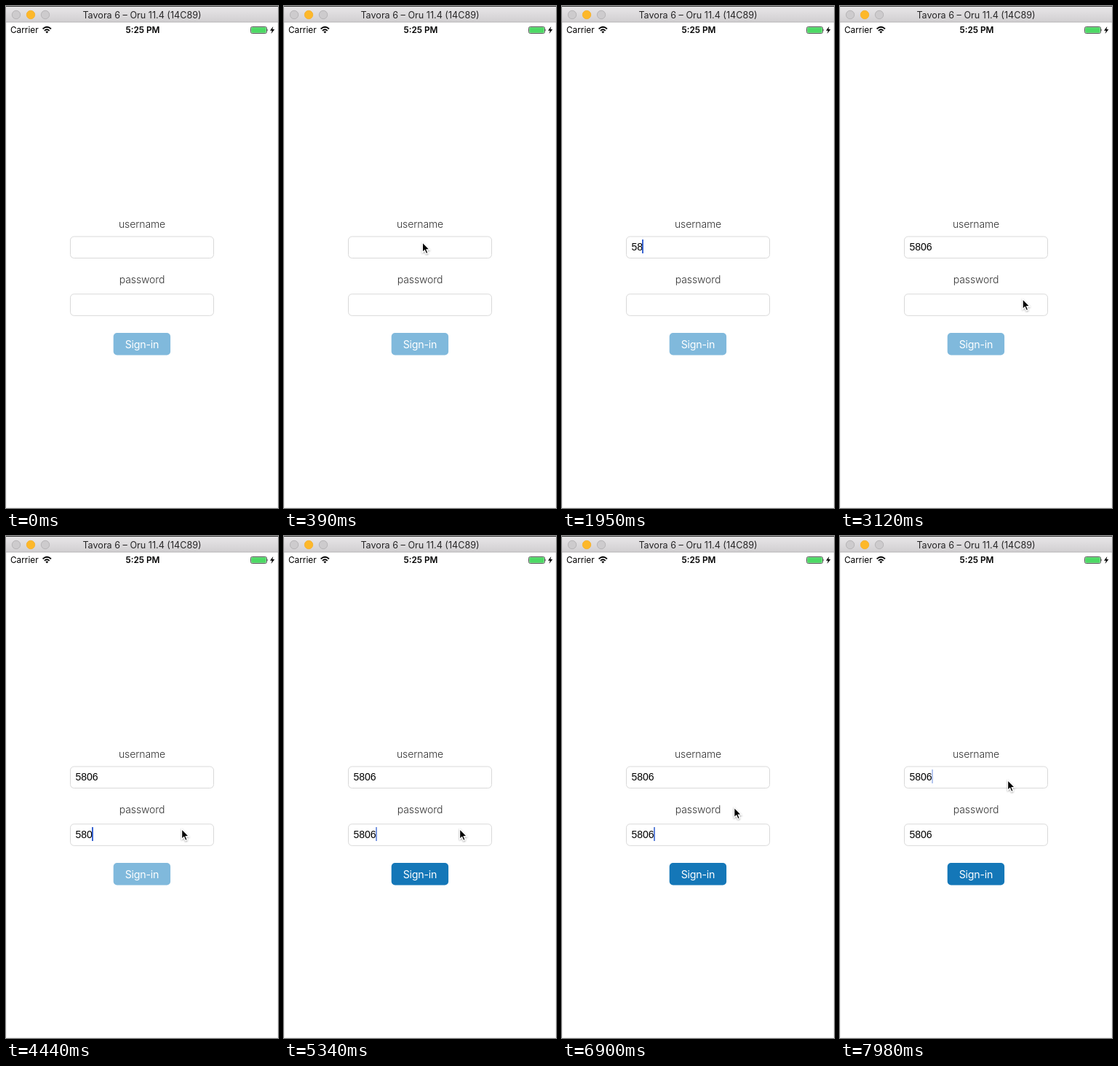
An HTML page for the animation above (8000 ms loop, 374 px wide and 688 px high).

```html
<!DOCTYPE html>
<html lang="en">
<head>
<meta charset="utf-8">
<title>Sign-in form</title>
<style>
  html, body { margin: 0; width: 100%; height: 100%; overflow: hidden; background: #fff; }
  svg { display: block; width: 374px; height: 688px; font-family: Inter, "Liberation Sans", sans-serif; }
  .mid { text-anchor: middle; }
  .label { font-size: 14px; font-weight: 300; letter-spacing: -.1px; fill: #333; }
  .value { font: 14px "Liberation Sans", Arial, sans-serif; }
  .field { fill: #fff; stroke: #d9d9d9; }
</style>
</head>
<body>
<svg viewBox="0 0 374 688">
  <defs>
    <linearGradient id="bar" x2="0" y2="1">
      <stop stop-color="#e9e7e9"/>
      <stop offset="1" stop-color="#d1cfd1"/>
    </linearGradient>
    <filter id="shadow" x="-50%" y="-50%" width="200%" height="200%">
      <feDropShadow dx="0" dy="1" stdDeviation=".9" flood-opacity=".4"/>
    </filter>
  </defs>
  <path d="M.5 22V687.5H373.5V22" fill="#fff" stroke="#f1f1f1"/>

  <!-- title bar -->
  <rect width="374" height="22" fill="url(#bar)"/>
  <path d="M0 .5H374" stroke="#3a3a3a"/>
  <path d="M0 22H374" stroke="#b4b2b4"/>
  <g fill="#cdcbcd" stroke="#b7b5b7">
    <circle cx="14" cy="12" r="5.7"/>
    <circle cx="34" cy="12" r="5.7" fill="#fdb82a" stroke="#f6b332"/>
    <circle cx="54" cy="12" r="5.7"/>
  </g>
  <text class="mid" x="187" y="16.5" font-size="12.6" fill="#262526">Tavora 6 – Oru 11.4 (14C89)</text>

  <!-- status bar -->
  <text x="6" y="37" font-size="11.8">Carrier</text>
  <g fill="none" stroke="#000" stroke-width="1.8">
    <path d="M50.6 31.4Q56.3 26.2 62 31.4M52.9 33.8Q56.3 30.8 59.7 33.8"/>
    <path d="M54.4 35.2Q56.3 33.6 58.2 35.2L56.3 37.4z" fill="#000" stroke="none"/>
  </g>
  <text class="mid" x="188" y="37" font-size="11.8" font-weight="600">5:25 PM</text>
  <rect x="336.5" y="28.5" width="22" height="9" rx="2" fill="#fff" stroke="#555"/>
  <rect x="337.3" y="29.3" width="20.4" height="7.4" rx="1" fill="#4cd964"/>
  <path d="M359.5 31.3q1.6 1.7 0 3.4z" fill="#333"/>
  <path d="M367.3 28L363 33.8H365.8L364.6 38 369.3 32H366.4z"/>

  <!-- form -->
  <text class="mid label" x="187" y="304">username</text>
  <rect class="field" x="88.5" y="316" width="197" height="29.5" rx="5"/>
  <text class="mid label" x="187" y="380">password</text>
  <rect class="field" x="88.5" y="394.8" width="197" height="29.5" rx="5"/>
  <text class="value" x="95.5" y="335"></text>
  <text class="value" x="95.5" y="414"></text>
  <rect id="button" x="147.7" y="448" width="78.4" height="30.5" rx="5"/>
  <text class="mid" x="187" y="469" font-size="14.2" letter-spacing="-.2" fill="#fff">Sign-in</text>
  <rect id="caret" width="2" height="19" fill="#3b66d2"/>
  <path id="pointer" d="M.6.6V14.4L3.7 11.6 5.8 16.4 8.2 15.4 6.2 10.7H10.4z" stroke="#fff" stroke-width="1.2" filter="url(#shadow)"/>
</svg>
<script>
const LOOP = 8000, STEP = 30, FADE = 210, CODE = "5806";
const $ = id => document.getElementById(id);
const values = document.querySelectorAll(".value");

// time, focused field, characters in it, time before the caret fades
const edits = [
  [900, 0, 0, 450], [1680, 0, 1, 450], [1950, 0, 2, 450], [2160, 0, 3, 450], [2400, 0, 4, 450],
  [3630, 1, 0, 270], [4050, 1, 1, 450], [4290, 1, 2, 450], [4440, 1, 3, 450], [4830, 1, 4, 450],
  [5670, 1, 3, 510], [6420, 1, 4, 450], [7350, 0, 4, 510]
];

const linear = u => u;
const easeOut = u => 1 - (1 - u) ** 2.4;
const easeInOut = u => u * u * (3 - 2 * u);

// start, end, from x, y, to x, y, easing
const moves = [
  [30, 450, 378, 235, 188, 324, easeOut],
  [1110, 1230, 188, 324, 234, 316, linear],
  [1230, 1500, 234, 316, 378, 320, linear],
  [2880, 3240, 374, 401, 241, 401, easeOut],
  [6720, 7110, 241, 401, 230, 334, easeInOut]
];

const clamp = u => Math.min(1, Math.max(0, u));

function pointerAt(t) {
  const move = moves.findLast(m => m[0] <= t);
  if (!move) return [400, 235];
  const [start, end, x0, y0, x1, y1, ease] = move;
  const u = ease(clamp((t - start) / (end - start)));
  return [x0 + (x1 - x0) * u, y0 + (y1 - y0) * u];
}

function draw(now) {
  const t = Math.floor(now % LOOP / STEP) * STEP;
  const lengths = [0, 0];
  let alpha = 0;
  for (const [time, field, count, hold] of edits) {
    if (time > t) break;
    lengths[field] = count;
    const fade = t - time - hold;
    alpha = fade < 0 ? 1 : clamp(1 - (fade + 10) / FADE);
    $("caret").setAttribute("x", Math.floor(95.2 + 7.78 * count));
    $("caret").setAttribute("y", field ? 399 : 320);
  }
  values.forEach((el, i) => el.textContent = CODE.slice(0, lengths[i]));
  $("caret").setAttribute("opacity", alpha);
  $("button").setAttribute("fill", lengths[0] + lengths[1] === 8 ? "#1477b8" : "#80b9dc");
  $("pointer").setAttribute("transform", `translate(${pointerAt(t)})`);
}

const begin = performance.now();
function tick() {
  draw(performance.now() - begin);
  requestAnimationFrame(tick);
}
tick();
</script>
</body>
</html>
```
